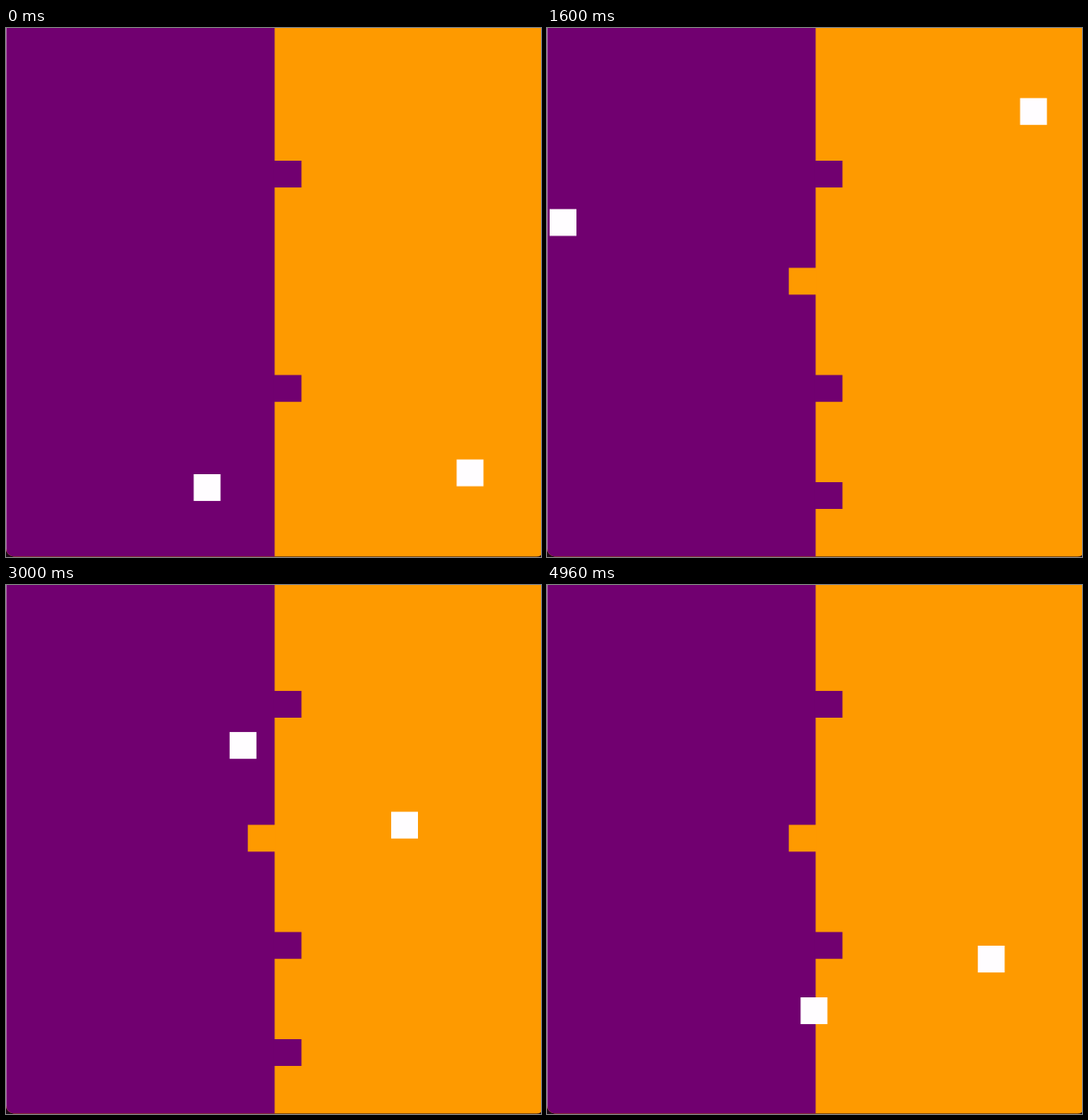
These frames come from a looping animation (600x594 px, 5 s). An HTML page with a canvas:

```html
<!DOCTYPE html>
<html>
<head>
<meta charset="utf-8">
<style>
  html, body { margin: 0; height: 100%; overflow: hidden; background: #1c0a18; }
  canvas { display: block; }
</style>
</head>
<body>
<canvas id="stage" width="600" height="594"></canvas>
<script>
const ctx = document.getElementById('stage').getContext('2d');
const LOOP = 5000, STEP = 40, CELL = 30.08, LEFT = 0.5, TOP = -1.4;
const SEAM = LEFT + 10 * CELL;
const PURPLE = '#710070', ORANGE = '#fe9a00', WHITE = '#fffdff';

// A ball keeps a steady speed on each axis from one bounce [time, wall] to the next
const balls = [
  {
    x: [[0, 210.5], [371, 301], [1608, 1], [2820, 301], [3888, 3], [4960, 284.4]],
    y: [[0, 501], [251, 569], [2354, -1], [4567, 568], [4960, 463]]
  },
  {
    x: [[0, 505.4], [754, 301], [1749, 571], [2638, 331], [3495, 570], [4406, 322], [4960, 483.2]],
    y: [[0, 484.5], [1930, -5], [4300, 570], [4960, 405]]
  }
];

// A tile changes hands when a ball bounces off it
const tiles = [
  { row: 4, color: PURPLE, from: 2820 },
  { row: 5, color: PURPLE, to: 2638 },
  { row: 9, color: ORANGE, from: 754 },
  { row: 13, color: PURPLE },
  { row: 17, color: PURPLE, from: 371, to: 4406 }
];

function along(path, t) {
  let i = 1;
  while (path[i][0] < t) i++;
  const [t0, v0] = path[i - 1], [t1, v1] = path[i];
  return v0 + (v1 - v0) * (t - t0) / (t1 - t0);
}

function rect(color, x, y, w = CELL, h = CELL) {
  ctx.fillStyle = color;
  ctx.fillRect(x, y, w, h);
}

function draw(t) {
  ctx.clearRect(0, 0, 600, 594);
  ctx.save();
  ctx.beginPath();
  ctx.roundRect(0, -20, 604, 613.4, 9);
  ctx.clip();
  rect(ORANGE, 0, 0, 600, 594);
  rect(PURPLE, 0, 0, SEAM, 594);
  rect('rgba(255,255,255,.35)', 0, 0, 1, 594);
  for (const { row, color, from = 0, to = LOOP } of tiles) {
    if (t < from || t >= to) continue;
    // overlap the seam by a pixel so that no hairline shows
    const x = color === PURPLE ? SEAM - 1 : SEAM - CELL;
    rect(color, x, TOP + row * CELL, CELL + 1);
  }
  for (const { x, y } of balls) rect(WHITE, along(x, t), along(y, t));
  ctx.restore();
}

function tick() {
  const t = performance.now() % LOOP;
  draw(Math.floor(t / STEP) * STEP);
  requestAnimationFrame(tick);
}
tick();
</script>
</body>
</html>
```
